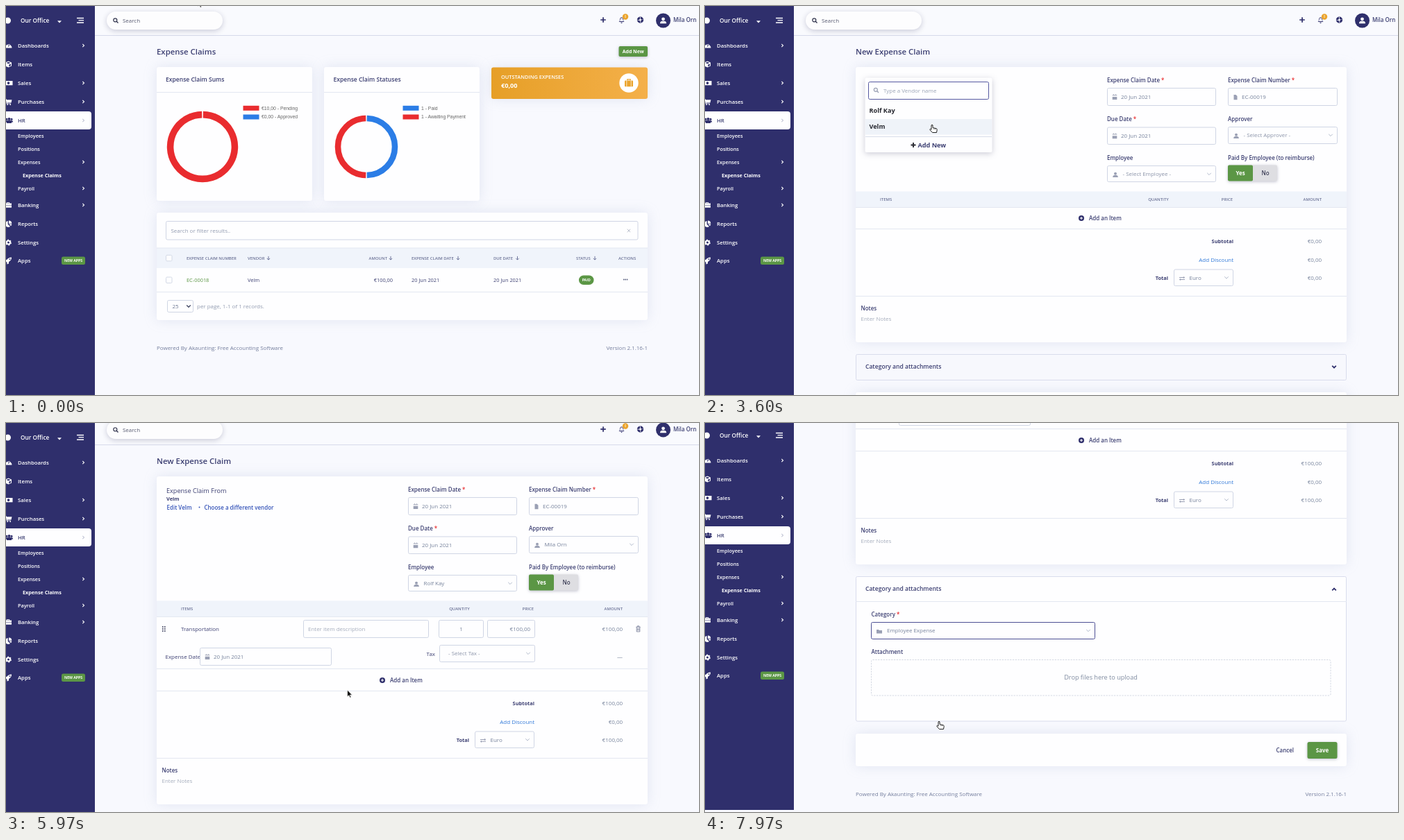
Recreate the animation shown at these times as an HTML page. Size 998 px wide and 561 px high, loop 8000 ms.

```html
<!DOCTYPE html>
<html lang="en">
<head>
<meta charset="utf-8">
<title>Expense claims</title>
<style>
  html, body { margin: 0; width: 100%; height: 100%; overflow: hidden; background: #f8f9fe; }
  svg { display: block; width: 100vw; height: 100vh; font-family: "Open Sans", sans-serif; }
  text { white-space: pre; }
  .chart { font-family: "Liberation Sans", sans-serif; }
  .card { filter: drop-shadow(0 0 9px rgba(136, 152, 190, .2)); }
  .pop { filter: drop-shadow(0 2px 4px rgba(50, 50, 93, .25)); }
  .btn { filter: drop-shadow(0 1px 2px rgba(50, 50, 93, .3)); }
</style>
</head>
<body>
<svg id="stage" viewBox="0 0 998 561" preserveAspectRatio="none"></svg>
<script>
const LOOP = 8000;
const INK = '#3c3f72', GREY = '#8898aa', DARK = '#2f2f6c', GREEN = '#5b9645', RED = '#e92c2f',
  BLUE = '#2b7de6', LINK = '#3453b8', LINE = '#cfd5e4', BAND = '#f0f4fb', WHITE = '#fefeff', PAGE = '#f8f9fe';
const ORG = 'Our Office', USER = 'Mila Orn', STAFF = 'Rolf Kay', VENDOR = 'Velm';

// Moments of the story, in ms
const AT = { form: 3000, vendor: 3740, staffOpen: 4180, staff: 4560, approverOpen: 4860, approver: 5240,
  item: 5540, price: 5800, accordion: 6800, categoryOpen: 7040, category: 7530 };

// Drawing helpers: y of a text is its visual middle
const text = (x, y, s, size = 7.98, fill = INK, weight = 400, anchor = 'start', cls = '') =>
  `<text x="${x}" y="${y + size * .36}" font-size="${size}" fill="${fill}" font-weight="${weight}" text-anchor="${anchor}" class="${cls}">${s}</text>`;
const box = (x, y, x2, y2, fill = WHITE, r = 0, stroke = 'none', extra = '') =>
  `<rect x="${x}" y="${y}" width="${x2 - x}" height="${y2 - y}" fill="${fill}" rx="${r}" stroke="${stroke}" ${extra}/>`;
const card = (x, y, x2, y2) => box(x, y, x2, y2, WHITE, 3, 'none', 'class="card"');
const line = (x, y, x2, color = '#e3e7f1') => `<path d="M${x} ${y}H${x2}" stroke="${color}" stroke-width="1"/>`;
const stroke = (d, color, w = 1, extra = '') => `<path d="${d}" fill="none" stroke="${color}" stroke-width="${w}" ${extra}/>`;
const fill = (d, color) => `<path d="${d}" fill="${color}" fill-rule="evenodd"/>`;
const dot = (x, y, r, color) => `<circle cx="${x}" cy="${y}" r="${r}" fill="${color}"/>`;
const move = (x, y, s) => `<g transform="translate(${x} ${y})">${s}</g>`;
const during = (from, to, s) => `<g data-from="${from}" data-to="${to}">${s}</g>`;
const swap = (t, before, after) => during(0, t, before) + during(t, LOOP, after);
const label = (x, y, s, need) => text(x, y, s + (need ? ` <tspan fill="${RED}">*</tspan>` : ''), 7.98, INK, 600);
const head = (x, y, s, anchor) => text(x, y, s, 5.93, '#6b7296', 600, anchor);
const value = (y, s) => text(888, y, s, 7.98, '#74809a', 400, 'end');
const total = (y, before, after) => swap(AT.price, value(y, before), value(y, after));
const plus = (x, y, r, color, w) => stroke(`M${x - r} ${y}h${2 * r}M${x} ${y - r}v${2 * r}`, color, w);
const chevron = (x, y, dir = 1, color = '#a9b3c6', r = 2.8, w = .9) =>
  stroke(`M${x - r} ${y - dir * r / 2}l${r} ${dir * r}l${r} ${-dir * r}`, color, w);
const right = (y, color) => stroke(`M110.3 ${y - 2.2}l2.2 2.2l-2.2 2.2`, color, 1.1);
const sortArrow = (x, y) => stroke(`M${x} ${y - 2.6}v5M${x - 2.2} ${y + .4}l2.2 2.2l2.2-2.2`, '#5e6690', .9);
const lens = (x, y, color) => `<circle cx="${x - .7}" cy="${y - .7}" r="2.5" fill="none" stroke="${color}" stroke-width="1.2"/>` +
  stroke(`M${x + 1.1} ${y + 1.1}l2.4 2.4`, color, 1.4);

const icons = {
  date: '<path d="M-3.3-2.2h6.6v-1h-6.6zM-3.3-.6h6.6v4.2h-6.6zM-2-4.2h1v1.2h-1zM1-4.2h1v1.2h-1z"/>',
  file: '<path d="M-2.5-3.6h3l2 2v5.4h-5z"/>',
  user: '<circle cy="-1.8" r="2"/><path d="M-3.8 3.6q0-3 2.6-3h2.4q2.6 0 2.6 3z"/>',
  folder: '<path d="M-4-2.4h3l1 1h4v4.4h-8z"/>',
  swap: '<path d="M-4-1.9h6v-1.2l2.2 1.7L2 .3v-1.2h-6zM4 1.9h-6v1.2l-2.2-1.7L-2-.3v1.2h6z"/>'
};
const icon = (name, x, y, color = '#9aa0b4') => `<g transform="translate(${x} ${y})" fill="${color}">${icons[name]}</g>`;
const input = (x, y, x2, y2, s, ic, color = '#74809a', edge = LINE) =>
  box(x + .5, y + .5, x2 - .5, y2 - .5, WHITE, 2, edge) +
  (ic ? icon(ic, x + 11, (y + y2) / 2 + .5) : '') +
  text(x + (ic ? 20 : 7), (y + y2) / 2 - .3, s, 7.98, color);
const select = (x, y, x2, y2, s, ic, open, color) =>
  input(x, y, x2, y2, '', '', '', open ? '#4c4f94' : LINE) + (ic ? icon(ic, x + 12, y + 13.5) : '') +
  text(x + (ic ? 22.5 : 13), y + 12.2, s, 7.98, color || '#8a93a8') +
  chevron(x2 - 10, y + 12.2, open ? -1 : 1);
const option = (x, y, x2, s) => `<g class="pop">${box(x, y, x2, y + 26, WHITE, 2)}${fill(`M${x + 20} ${y}l4-4l4 4z`, WHITE)}</g>` +
  box(x + 1, y + 4, x2 - 1, y + 23, '#f3f5fa') + text(x + 12, y + 13, s, 7.98, INK);
const arcRing = (cx, cy, r, w, parts) => parts.map(([a, b, color]) => {
  const p = d => `${cx + r * Math.sin(d * Math.PI / 180)} ${cy - r * Math.cos(d * Math.PI / 180)}`;
  return stroke(`M${p(a)}A${r} ${r} 0 ${b - a > 180 ? 1 : 0} 1 ${p(b)}`, color, w);
}).join('');
const legend = (x, y, color, s) => box(x, y - 3.5, x + 23, y + 3.5, color) + text(x + 26.5, y, s, 6.84, '#666', 400, 'start', 'chart');
const footer = y => text(217, y, 'Powered By Akaunting: Free Accounting Software', 7.98, '#737d9c') +
  text(924, y, 'Version 2.1.16-1', 7.98, '#737d9c', 400, 'end');
const title = s => text(217, 66, s, 11.4, INK, 600);

function sidebar() {
  const item = (y, s, more) => text(17, y, s, 7.75, '#fff', 600) + (more ? right(y, '#fff') : '');
  const sub = (y, s, more) => text(17, y, s, 7.25, '#fff', 600) + (more ? right(y, '#fff') : '');
  const glyph = (y, d, color = '#fff') => move(3.5, y, fill(d, color));
  return box(0, 0, 128, 561, DARK) +
    dot(2.5, 21, 4.5, '#fff') + text(21, 21, ORG, 8.3, '#fff', 600) + fill('M74 21.3h6l-3 3.2z', '#fff') +
    stroke('M102 17.5h10M104.500 20.700h7.5M102 24h10', '#fff', 1.3) +
    item(57, 'Dashboards', 1) + item(84, 'Items') + item(111, 'Sales', 1) + item(138, 'Purchases', 1) +
    box(-5, 152, 123, 178, WHITE, 4) + text(17, 165, 'HR', 7.75, INK, 600) + right(165, '#c3c6d6') +
    sub(187, 'Employees') + sub(206, 'Positions') + sub(225, 'Expenses', 1) +
    text(24, 244, 'Expense Claims', 7.26, '#fff', 700) + sub(263, 'Payroll', 1) +
    item(287, 'Banking', 1) + item(314, 'Reports') + item(341, 'Settings') + item(367, 'Apps') +
    box(80, 361.500, 114, 373, GREEN, 2.5) + text(97, 367.3, 'NEW APPS', 5.1, '#fff', 700, 'middle') +
    glyph(57, 'M-5 3.500A5 5 0 1 1 5 3.500zM-.7 1.500h1.400L2-2L1.2-2.300z') +
    glyph(84, 'M0-4.500l4.500 2v5L0 4.500l-4.500-2v-5zM-3-2L0-.800L3-2L0-3.200zM.8 .500v2.700L3.500 2v-2.600z') +
    glyph(111, 'M-5.500-3h11.500v6.200h-11.500zM0-1.800a1.800 1.900 0 1 0 .1 0z') +
    glyph(138, 'M-5.500-4h2.500l.4 1.200h7.600L4 1.400h-5.500l.2 1H3.500v.9H-2.500L-3.800-3h-1.700zM-2 3.500h1.500v1.500h-1.500zM2 3.500h1.500v1.500h-1.500z') +
    move(3.5, 165, `<g fill="${DARK}"><circle cx="-2.5" cy="-1.800" r="1.500"/><circle cx="1" cy="-2" r="2"/><circle cx="4.500" cy="-1.800" r="1.500"/><path d="M-5 2.500q0-2.500 3-2.500h6q3 0 2.500 2.500H4.500v1.500h-7v-1.500z"/></g>`) +
    glyph(287, 'M-4.500-2.500h2v-1.500h4v1.500h3v2.700h-9zM-1.500-3.200v.7h2v-.7zM-4.500 .800h9v3h-9z') +
    glyph(314, 'M-.8-4v4.800l3.300 3.300A4.500 4.500 0 1 1-.8-4zM.5-4.500A4.300 4.300 0 0 1 4.800-.300H.5zM.9 .600h4A4.500 4.500 0 0 1 3.500 3.300z') +
    move(3.5, 341, `<circle r="2.5" fill="none" stroke="#fff" stroke-width="2"/><circle r="3.800" fill="none" stroke="#fff" stroke-width="1.2" stroke-dasharray="2 1.980"/>`) +
    glyph(367, 'M4.500-4.500q.3 4-4 6.500v2.500l-2.500 1v-2.500L-3.500 1.500h-2.500l1-2.500h2.500Q.5-4.800 4.500-4.500zM2-2.800a.9 .9 0 1 0 .1 0z');
}

function topbar() {
  return box(128, 0, 998, 43, '#f9fafe') + line(128, 42.5, 998, '#d6d9ea') +
    `<g class="pop" opacity=".98">${box(145, 8, 312, 34, WHITE, 13)}</g>` +
    lens(158, 21, '#33364f') + text(168, 21, 'Search', 7.98, '#55586e') +
    plus(860, 20, 3.8, DARK, 1.7) +
    fill('M882.500 23q1.500-1 1.500-4q.3-2.500 2.500-2.800q2.200 .300 2.500 2.800q0 3 1.500 4zM883.700 22h5.600q-1-1.500-1-3a1.800 1.800 0 0 0-3.600 0q0 1.500-1 3zM885.300 23.800h2.400q-.3 1.200-1.200 1.200t-1.200-1.200z', DARK) +
    dot(892, 15.5, 4.2, '#eba42c') + text(892, 15.5, '0', 4.5, '#fff', 400, 'middle') +
    `<circle cx="913.500" cy="20" r="3" fill="none" stroke="${DARK}" stroke-width="2.800" stroke-dasharray="3.700 1.010"/><circle cx="913.500" cy="20" r="4.200" fill="none" stroke="${DARK}" stroke-width=".7"/>` +
    dot(946.5, 21, 10.5, DARK) + move(946.5, 21, `<g transform="scale(1.2)">${icon('user', 0, 0, '#fff')}</g>`) +
    text(961, 20.5, USER, 7.98, INK, 600);
}

function listPage() {
  const check = y => box(230.5, y - 4, 239, y + 4.5, WHITE, 1.5, '#d3d9e6');
  return title('Expense Claims') +
    `<g class="btn">${box(882.5, 58, 924, 73, GREEN, 2)}</g>` + text(903.2, 65.3, 'Add New', 6.9, '#fff', 700, 'middle') +
    card(217, 88, 441, 281) + text(230, 106, 'Expense Claim Sums', 8.55, INK, 600) + line(217, 124.5, 441) +
    arcRing(283, 203, 46.4, 9.6, [[1, 359, RED]]) +
    legend(341.5, 147.3, RED, '€10,00 - Pending') + legend(341.5, 160, BLUE, '€0,00 - Approved') +
    card(458, 88, 682, 281) + text(471.5, 106, 'Expense Claim Statuses', 8.55, INK, 600) + line(458, 124.5, 682) +
    arcRing(519, 203, 41, 8.6, [[1, 179, BLUE], [181, 359, RED]]) +
    legend(571.5, 147.3, BLUE, '1 - Paid') + legend(571.5, 160, RED, '1 - Awaiting Payment') +
    `<g class="card">${box(699, 88.5, 924, 134, 'url(#amber)', 3)}</g>` +
    text(713, 102.7, 'OUTSTANDING EXPENSES', 7.41, '#fff', 600) + text(713, 115, '€0,00', 9.12, '#fff', 700) +
    dot(897, 111, 13.7, '#fff') + box(891, 107.5, 903, 116.2, '#eba42c', 1) +
    stroke('M894.700 107.500v-1.700h4.600v1.700', '#eba42c', 1.2) + stroke('M893.800 107v9.500M900.200 107v9.500', '#fff', .7) +
    card(217, 298, 924, 453) + box(230.5, 310.5, 910, 337, WHITE, 2, LINE) +
    text(237.5, 324, 'Search or filter results..', 7.98, '#929bb0') +
    stroke('M894.700 321.800l4.400 4.400m0-4.400l-4.400 4.400', '#a5adbd', .8) +
    box(217, 349, 924, 378, BAND) + line(217, 349, 924) + line(217, 412.5, 924) +
    check(363.3) + check(395) +
    head(260, 363.5, 'EXPENSE CLAIM NUMBER') + head(348, 363.5, 'VENDOR') + head(549, 363.5, 'AMOUNT', 'end') +
    head(584, 363.5, 'EXPENSE CLAIM DATE') + head(702, 363.5, 'DUE DATE') + head(821, 363.5, 'STATUS') + head(882, 363.5, 'ACTIONS') +
    [378, 554, 651, 736.5, 848].map(x => sortArrow(x, 363.5)).join('') +
    text(260, 395, 'EC-00018', 7.41, '#56933f') + text(348, 395, VENDOR, 7.41) + text(557, 395, '€100,00', 7.41, INK, 400, 'end') +
    text(584, 395, '20 Jun 2021', 7.41) + text(702, 395, '20 Jun 2021', 7.41) +
    box(825, 388.5, 846.5, 402, GREEN, 6.7) + text(835.7, 395.2, 'PAID', 5.2, '#fff', 700, 'middle') +
    [889.8, 892.2, 894.6].map(x => dot(x, 394.5, .9, '#5a6080')).join('') +
    box(232.5, 424.5, 269.5, 441.5, WHITE, 2, LINE) + text(239.5, 433.2, '25', 7.98, '#6d7893') + chevron(263, 432.8, 1, '#444a66', 2.8, 1.4) +
    text(275, 433, 'per page, 1-1 of 1 records.', 7.98, '#929bb0') + footer(493);
}

function vendorArea() {
  const picker = `<g class="pop">${box(230.500, 103.500, 413.500, 211, WHITE, 2)}</g>` +
    box(235.5, 109.5, 408.5, 134.5, WHITE, 2, '#5558a0') + lens(246.5, 121.5, '#9aa0b4') +
    text(257, 122, 'Type a Vendor name', 7.98, '#9aa3b5') +
    text(236.5, 151, STAFF, 9.12, '#25262e', 700) + box(231, 163, 413, 185.5, '#eff3f9') + text(236.5, 173.7, VENDOR, 9.12, '#25262e', 700) +
    line(231, 188.5, 413, '#d9deea') + plus(300, 200.5, 3.5, '#25262e', 1.8) + text(306.5, 200.7, 'Add New', 9.12, INK, 700);
  const chosen = text(231, 108.5, 'Expense Claim From', 9.12) + text(231, 120.7, VENDOR, 7.41, INK, 700) +
    text(231.5, 133.3, 'Edit ' + VENDOR, 7.98, LINK, 600) + dot(278.5, 132.5, 1, LINK) +
    text(285.5, 133.3, 'Choose a different vendor', 7.98, LINK, 600);
  return swap(AT.vendor, picker, chosen);
}

function itemRow() {
  const handle = [225.8, 228.8].map(x => [305, 308, 311].map(y => dot(x, y, .95, '#3f4260')).join('')).join('');
  const field = (x, x2) => box(x + .5, 295.5, x2 - .5, 320.5, WHITE, 2, LINE);
  const price = s => text(755, 308.5, s, 7.98, '#74809a', 400, 'end') + value(308.5, s);
  return handle + text(252, 308.3, 'Transportation', 7.98) +
    input(428, 295, 609, 321, 'Enter item description', '', '#a3abbb') +
    field(623, 688) + text(655.5, 308.5, '1', 7.98, '#74809a', 400, 'middle') + field(693, 762) +
    swap(AT.price, price('€0,00'), price('€100,00')) +
    stroke('M907.300 305.300h6.400M908.200 305.500v6.500h4.600v-6.500M909.300 305v-1.200h2.400v1.200M909.700 307v3.500M911.300 307v3.500', '#6d7390', .8) +
    text(229.5, 348.5, 'Expense Date', 7.98) + input(279, 335, 469, 361, '20 Jun 2021', 'date') +
    text(618, 344.5, 'Tax', 7.98, INK, 400, 'end') + select(624, 331, 762, 356, '- Select Tax -') +
    value(348, '—') + line(217, 365.5, 924);
}

function accordion() {
  const heading = text(231, 520, 'Category and attachments', 8.55, INK, 600);
  const closed = box(217.5, 502.5, 923.5, 539.5, '#f7f8fd', 2, '#d9dcec') + heading + chevron(906, 520.3, 1, DARK, 2.8, 1.8);
  const picker = `<g class="pop">${box(239, 494, 562, 562, WHITE, 2)}</g>` +
    text(251.5, 508, 'Employee Expense', 7.98) + text(251.5, 527.3, 'Other', 7.98, DARK, 700) + line(239, 539.5, 562) +
    plus(380, 551, 3.2, DARK, 1.4) + text(388.5, 551, 'Add New', 7.98, DARK, 700);
  const open = box(217.5, 502.5, 923.5, 711, WHITE, 2, '#d9dcec') + heading + chevron(906, 521, -1, DARK, 2.8, 1.8) + line(217, 538.5, 924) +
    label(239.5, 557, 'Category', 1) +
    during(0, AT.categoryOpen, select(239, 568, 562, 593, 'Other', 'folder', 0, '#74809a')) +
    during(AT.categoryOpen, AT.category, select(239, 568, 562, 593, 'Other', 'folder', 1) + stroke('M262.500 575.500v10', '#444a66', .7)) +
    during(AT.category, LOOP, box(239.5, 568.5, 561.5, 592.5, WHITE, 2, '#4c4f94') + icon('folder', 251, 581.5) +
      text(262, 580.3, 'Employee Expense', 7.98, '#74809a') + chevron(552, 580.3)) +
    label(239.5, 611, 'Attachment') + box(239.5, 622.5, 901, 674, 'none', 2, '#d3d8e2', 'stroke-dasharray="2.300 1.500"') +
    text(570, 648, 'Drop files here to upload', 9.12, '#7f8ba0', 400, 'middle') +
    during(AT.categoryOpen, AT.category, picker);
  return swap(AT.accordion, closed, open);
}

function formPage() {
  const approver = (s, open, color) => select(753, 174, 911, 199, s, 'user', open, color);
  const staff = (s, open, color) => select(579, 230, 736, 254, s, 'user', open, color);
  const lower = dot(542, 306, 4, DARK) + plus(542, 306, 2.1, '#fff', 1.1) + text(553, 305.8, 'Add an Item', 7.98, INK, 600) +
    line(217, 321.5, 924) +
    text(761, 339.5, 'Subtotal', 7.41, INK, 700, 'end') + total(339.5, '€0,00', '€100,00') +
    text(761, 366, 'Add Discount', 7.98, '#2f78d8', 400, 'end') + value(366, '€0,00') +
    text(667, 392, 'Total', 7.41, INK, 700, 'end') + select(675, 379.5, 761, 404, 'Euro', 'swap', 0, '#74809a') + total(392.5, '€0,00', '€100,00') +
    line(217, 418.5, 924) + label(224.5, 436.5, 'Notes') + text(224.5, 450.7, 'Enter Notes', 7.98, '#a3abbb') +
    `<g id="save">${card(217, 557, 924, 604)}${text(848, 580.800, 'Cancel', 7.98, INK, 600, 'end')}` +
    `<g class="btn">${box(867.500, 569, 910.500, 593, GREEN, 2.5)}</g>${text(889, 580.800, 'Save', 7.98, '#fff', 700, 'middle')}${footer(644)}</g>` +
    accordion();
  return title('New Expense Claim') +
    swap(AT.item, card(217, 88, 924, 485), card(217, 88, 924, 561)) +
    vendorArea() +
    label(579, 107.5, 'Expense Claim Date', 1) + input(579, 118, 736, 144, '20 Jun 2021', 'date') +
    label(753, 107.5, 'Expense Claim Number', 1) + input(753, 118, 911, 144, 'EC-00019', 'file') +
    label(579, 163.3, 'Due Date', 1) + input(579, 174.5, 736, 200, '20 Jun 2021', 'date') +
    label(753, 163.3, 'Approver') + label(579, 219.5, 'Employee') + label(753, 219.5, 'Paid By Employee (to reimburse)') +
    `<g class="btn">${box(753, 229.500, 824, 252.500, '#dedee2', 2)}${box(753, 229.500, 789, 252.500, GREEN, 2)}</g>` +
    text(771, 241, 'Yes', 7.98, '#fff', 700, 'middle') + text(807, 241, 'No', 7.98, '#3b3d55', 600, 'middle') +
    box(217, 267.5, 924, 290, BAND) + line(217, 290.5, 924) +
    head(252, 279, 'ITEMS') + head(653, 279, 'QUANTITY', 'middle') + head(752, 279, 'PRICE', 'middle') + head(888, 279, 'AMOUNT', 'end') +
    during(AT.item, LOOP, itemRow()) + `<g id="lower">${lower}</g>` +
    during(0, AT.staffOpen, staff('- Select Employee -')) +
    during(AT.staffOpen, AT.staff, staff('- Select Employee -', 1) + option(579, 262, 736, STAFF)) +
    during(AT.staff, LOOP, staff(STAFF, 0, '#74809a')) +
    during(0, AT.approverOpen, approver('- Select Approver -')) +
    during(AT.approverOpen, AT.approver, approver('- Select Approver -', 1) + option(753, 206, 911, USER)) +
    during(AT.approver, LOOP, approver(USER, 0, '#74809a'));
}

const arrow = '<path d="M0 0V9.700l2.300-2 1.600 3.500 1.600-.7-1.600-3.400H7Z" fill="#111" stroke="#fff" stroke-width=".7"/>';
const hand = '<path d="M-1 .900Q0-.300 1 .900V4.500l5 1.200q1.500 .500 1.200 2L6.500 11.500H.500L-3 7.700q-.6-1.200 .600-1.400L-1 7.200z" fill="#fff" stroke="#222" stroke-width="1"/><path d="M2.700 5.500v1.500M4.700 6v1.200" stroke="#222" stroke-width=".7"/>';
const stage = document.getElementById('stage');
stage.innerHTML = `<defs><linearGradient id="amber"><stop stop-color="#e69f27"/><stop offset="1" stop-color="#f4b04a"/></linearGradient></defs>` +
  box(0, 0, 998, 561, PAGE) +
  `<g id="view"><g id="page">${topbar()}${swap(AT.form, listPage(), formPage())}</g>${sidebar()}</g>` +
  `<g id="cursor"><g id="arrow">${arrow}</g><g id="hand">${hand}</g></g>`;

const timed = [...stage.querySelectorAll('[data-from]')].map(el => ({ el, from: +el.dataset.from, to: +el.dataset.to }));
const part = Object.fromEntries(['view', 'page', 'lower', 'save', 'cursor', 'arrow', 'hand'].map(id => [id, document.getElementById(id)]));

// Tracks of [time, ...values], eased between stops
const path = [[0, 276, -9], [500, 420, 110], [1300, 902, 66], [1950, 902, 66], [2740, 377, 127], [3100, 320, 145], [3600, 327, 171],
  [3760, 327, 171], [4080, 655, 240], [4260, 655, 240], [4440, 625, 270], [4580, 625, 270], [4800, 785, 184], [4920, 785, 184], [5110, 777, 213],
  [5260, 777, 213], [5480, 570, 302], [5600, 570, 302], [6040, 486, 391], [6450, 486, 391], [6720, 400, 409],
  [6820, 400, 409], [7020, 334, 465], [7330, 334, 465], [7480, 320, 398], [7580, 320, 398], [7780, 337, 430], [8000, 337, 430]];
const scroll = [[0, 0], [5920, 0], [6260, 182], [7600, 182], [7900, 354], [8000, 354]];
const bounce = [[0, 0], [6220, 0], [6300, 3], [6370, 3], [6520, 0], [7860, 0], [7930, 3], [8000, 3]];
const hands = [[1200, 2000], [3150, 3800], [4050, 5560], [6680, 8000]];

function sample(track, t) {
  const i = track.findIndex(stop => stop[0] > t);
  const a = track[i - 1], b = track[i];
  const u = (t - a[0]) / (b[0] - a[0]), k = u * u * (3 - 2 * u);
  return a.slice(1).map((v, j) => v + (b[j + 1] - v) * k);
}
const shift = (el, x, y) => el.setAttribute('transform', `translate(${x} ${y})`);
const show = (el, on) => { el.style.display = on ? '' : 'none'; };

function render(t) {
  for (const { el, from, to } of timed) show(el, t >= from && t < to);
  shift(part.view, 0, -sample(bounce, t)[0]);
  shift(part.page, 0, -sample(scroll, t)[0]);
  shift(part.lower, 0, t >= AT.item ? 76 : 0);
  shift(part.save, 0, t >= AT.accordion ? 172 : 0);
  shift(part.cursor, ...sample(path, t));
  const pointing = hands.some(([a, b]) => t >= a && t < b);
  show(part.hand, pointing);
  show(part.arrow, !pointing);
}

const start = performance.now();
function tick() {
  render((performance.now() - start) % LOOP);
  requestAnimationFrame(tick);
}
tick();
</script>
</body>
</html>
```
